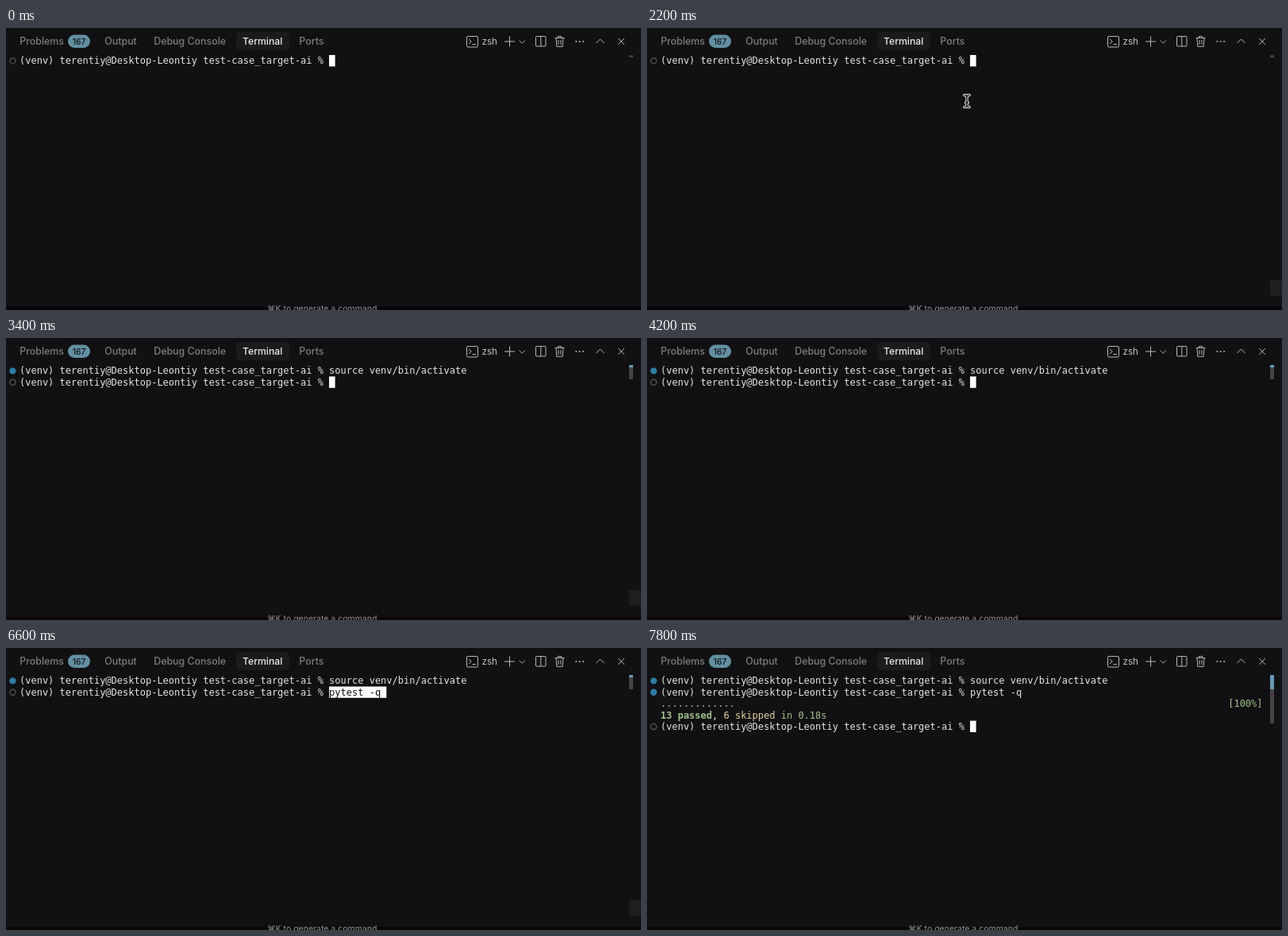
Write an HTML page with a canvas that moves like this. It is 800x355 px and loops after 8 s.

```html
<!DOCTYPE html>
<html lang="en">
<head>
<meta charset="utf-8">
<title>Terminal session</title>
<style>
  html, body { margin: 0; width: 100%; height: 100%; overflow: hidden; background: #111113; }
  canvas { display: block; width: 800px; height: 355px; }
</style>
</head>
<body>
<canvas id="stage"></canvas>
<script>
const W = 800, H = 355, LOOP = 8000, STEP = 200;
const canvas = document.getElementById('stage');
const ctx = canvas.getContext('2d');
const dpr = window.devicePixelRatio || 1;
canvas.width = W * dpr;
canvas.height = H * dpr;

const UI = 'Inter, "DejaVu Sans", sans-serif';
const MONO = '12px "DejaVu Sans Mono", monospace';
const C = {
  bg: '#111113', text: '#e4e4e5', dim: '#7d7d7f', icon: '#b8b8b9',
  blue: '#2f7ca3', ring: '#5c5c5e', green: '#a3c18a', yellow: '#e4cf9c',
  mark: '#434345', markDone: '#6697b3', badge: '#628fa1'
};
const LEFT = 17, TOP = 34, CELL = 7.224, ROW = 14.4;
const PROMPT = '(venv) terentiy@Desktop-Leontiy test-case_target-ai % ';
const ACTIVATE = 'source venv/bin/activate', TEST = 'pytest -q';
const INPUT = PROMPT.length;

// Moments in ms
const PASTE1 = 2600, RUN1 = 3400, BLUR = 4800, FOCUS = 6000,
      PASTE2 = 6200, RUN2 = 6800, DOTS = 7400, DONE = 7600;

const moves = [
  [[1700, 398, -14], [2000, 402, 92], [2400, 404, 92], [2800, 405, 75.5], [3000, 405, 75.5], [3300, 392, -14]],
  [[5600, 508, 82.5], [5800, 478, 90], [6200, 470, 90], [6400, 452, 42], [6550, 440, -14]]
];

const colX = c => LEFT + c * CELL;
const rowY = r => TOP + r * ROW;
const clamp = v => Math.max(0, Math.min(1, v));

function rect(x, y, w, h, fill, radius = 0) {
  ctx.fillStyle = fill;
  ctx.beginPath();
  ctx.roundRect(x, y, w, h, radius);
  ctx.fill();
}

function label(str, x, y, color, font, align = 'left') {
  ctx.font = font;
  ctx.fillStyle = color;
  ctx.textAlign = align;
  ctx.fillText(str, x, y);
}

function stroke(path, color = C.icon, width = 1) {
  ctx.strokeStyle = color;
  ctx.lineWidth = width;
  ctx.stroke(new Path2D(path));
}

function print(str, col, row, color = C.text, bold = false) {
  label(str, colX(col), rowY(row) + 11.3, color, (bold ? 'bold ' : '') + MONO);
}

function block(col, row, outlined) {
  const x = colX(col), y = rowY(row);
  if (outlined) {
    ctx.strokeStyle = '#f4f4f4';
    ctx.lineWidth = 1;
    ctx.strokeRect(x + 0.5, y + 0.6, CELL - 0.6, 13.4);
  } else {
    rect(x - 0.1, y, CELL + 0.4, ROW, '#fff');
  }
}

function pasted(cmd, row) {
  rect(colX(INPUT), rowY(row), (cmd.length + 1) * CELL, ROW, '#fff');
  print(cmd, INPUT, row, '#111113');
}

function status(row, done) {
  ctx.beginPath();
  ctx.arc(8.4, rowY(row) + 7.4, done ? 4.2 : 3.6, 0, Math.PI * 2);
  if (done) {
    ctx.fillStyle = C.blue;
    ctx.fill();
  } else {
    ctx.strokeStyle = C.ring;
    ctx.lineWidth = 1.2;
    ctx.stroke();
  }
}

function header() {
  const font = '500 12.4px ' + UI, y = 21.2;
  rect(290, 5, 67, 23, '#1b1b1d', 5);
  label('Problems', 17.3, y, C.dim, font);
  label('Output', 124.3, y, C.dim, font);
  label('Debug Console', 186.2, y, C.dim, font);
  label('Terminal', 298, y, '#ececed', '500 12.2px ' + UI);
  label('Ports', 369.3, y, C.dim, font);
  rect(78, 8.5, 28, 16.5, C.badge, 8.2);
  label('167', 92, 20.5, '#121517', '500 10.3px ' + UI, 'center');
  label('zsh', 599.5, y, '#c2c2c3', '400 11.7px ' + UI);

  stroke('M582 10.5H593Q594.5 10.5 594.5 12V22.5Q594.5 24 593 24H582Q580.5 24 580.5 22.5V12Q580.5 10.5 582 10.5Z');
  stroke('M583 14L586.3 17L583 20M587.5 20.5H592');
  stroke('M628 17H641M634.5 10.5V23.5');
  stroke('M646.5 15.5L650.2 19.2L654 15.5', C.icon, 0.9);
  stroke('M668.5 10.5H679Q680 10.5 680 11.5V22Q680 23 679 23H668.5Q667.5 23 667.5 22V11.5Q667.5 10.5 668.5 10.5ZM673.8 10.5V23');
  stroke('M691.5 12.5H703.5M695.5 12.5V10.5H699.5V12.5M693 12.5L693.8 23.3H701.2L702 12.5M696 15V20.8M699 15V20.8');
  for (const x of [718.3, 722.7, 727.1]) rect(x - 1, 16, 2, 2, C.icon, 1);
  stroke('M743.5 19L748.5 14L753.5 19');
  stroke('M771.3 13L779 20.8M779 13L771.3 20.8');
}

function footer() {
  rect(0, 351, W, 4, '#0a0607');
  label('⌘K to generate a command', 398.2, 356.8, '#929294', '400 10.5px ' + UI, 'center');
}

function session(t) {
  print(PROMPT, 0, 0);
  status(0, t >= RUN1);
  if (t < PASTE1) return block(INPUT, 0);
  if (t < RUN1) return pasted(ACTIVATE, 0);

  print(ACTIVATE, INPUT, 0);
  print(PROMPT, 0, 1);
  status(1, t >= DONE);
  if (t < PASTE2) return block(INPUT, 1, t >= BLUR && t < FOCUS);
  if (t < RUN2) return pasted(TEST, 1);

  print(TEST, INPUT, 1);
  if (t < DOTS) return block(0, 2);
  print('.'.repeat(13), 0, 2, C.green);
  print('[100%]', 99, 2, C.green);
  if (t < DONE) return block(0, 3);

  print('13 passed', 0, 3, C.green, true);
  print(', ', 9, 3);
  print('6 skipped', 11, 3, C.yellow);
  print(' in 0.18s', 20, 3, C.green);
  print(PROMPT, 0, 4);
  status(4, false);
  block(INPUT, 4);
}

function ruler(t) {
  if (t < RUN1) return rect(785, 34.3, 5, 2.8, C.mark);
  const [split, end] = t < DONE ? [37.5, 52] : [52, 95];
  rect(785, 34, 5, split - 34, C.markDone);
  rect(785, split, 5, end - split, C.mark);
}

// The scroll corner shows while the pointer is inside and fades after it leaves.
function corner(t) {
  const show = (start, end) => Math.min(clamp((t - start) / 300), clamp(1 - (t - end) / 700));
  ctx.globalAlpha = Math.max(show(1600, 3400), show(5550, 6600));
  rect(785, 317, 15, 20, '#1e1e20');
  ctx.globalAlpha = 1;
}

function tooltip(t) {
  if (t < 5600 || t >= 5800) return;
  const edge = 'M362 0Q362.5 2 365 2H381L385 4.5L389 2H406Q409 2 409.5 0';
  ctx.fillStyle = '#18181a';
  ctx.fill(new Path2D(edge));
  stroke(edge, '#1f1f21');
}

function pointer(t) {
  for (const path of moves) {
    const i = path.findIndex(p => p[0] > t) - 1;
    if (i < 0) continue;
    const [a, b] = [path[i], path[i + 1]];
    const k = (t - a[0]) / (b[0] - a[0]);
    ctx.save();
    ctx.translate(a[1] + (b[1] - a[1]) * k, a[2] + (b[2] - a[2]) * k);
    ctx.lineCap = 'round';
    const beam = 'M-3.2 -7.6Q0 -7.6 0 -5Q0 -7.6 3.2 -7.6M0 -5V5M-3.2 7.6Q0 7.6 0 5Q0 7.6 3.2 7.6M-1.4 2H1.4';
    stroke(beam, '#f2f2f2', 3.4);
    stroke(beam, '#111113', 1.4);
    ctx.restore();
  }
}

function draw(now) {
  const t = Math.floor((now % LOOP) / STEP) * STEP;
  ctx.setTransform(dpr, 0, 0, dpr, 0, 0);
  rect(0, 0, W, H, C.bg);
  header();
  session(t);
  ruler(t);
  corner(t);
  footer();
  tooltip(t);
  pointer(t);
}

const start = performance.now();
function tick() {
  draw(performance.now() - start);
  requestAnimationFrame(tick);
}
tick();
</script>
</body>
</html>
```
